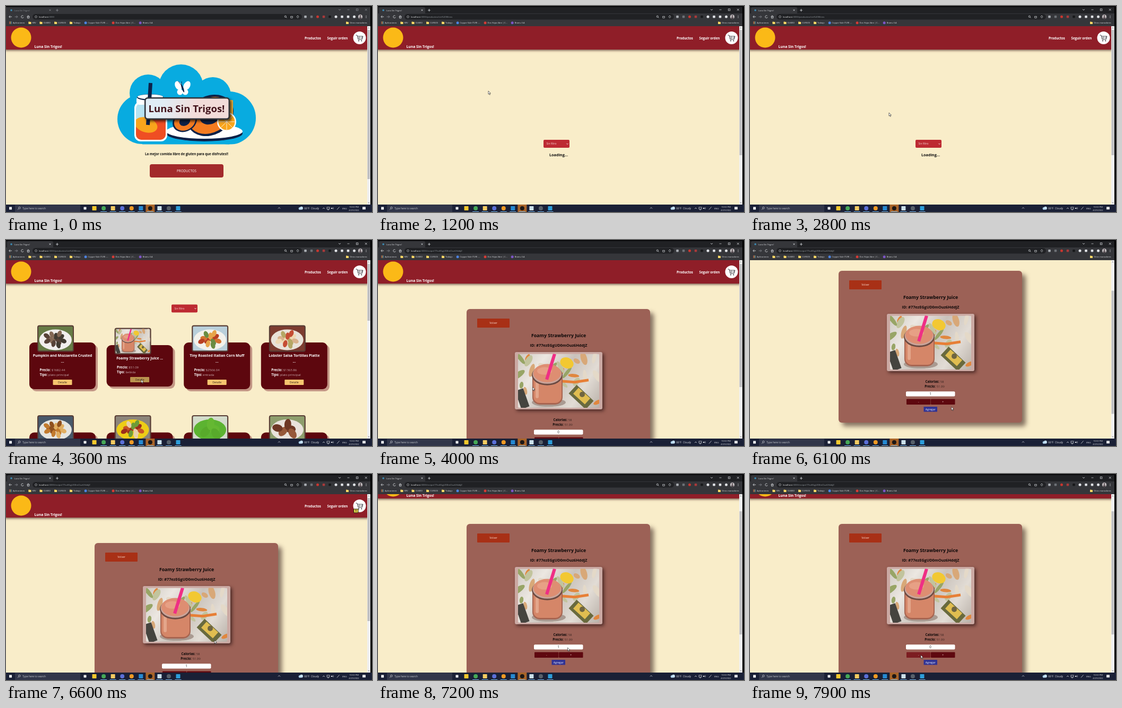
Recreate the animation shown at these times as an HTML page with a canvas. Size 690x388 px, loop 8 s.

```html
<!DOCTYPE html>
<html lang="es">
<head>
<meta charset="utf-8">
<title>Luna Sin Trigos!</title>
<style>
html, body { margin: 0; width: 100%; height: 100%; overflow: hidden; background: #000; }
canvas { display: block; width: 690px; height: 388px; }
</style>
</head>
<body>
<canvas id="stage"></canvas>
<script>
const LOOP = 8000, STEP = 100, TAU = Math.PI * 2;
const BRAND = 'Luna Sin Trigos!', DRINK = 'Foamy Strawberry Juice';
const cv = document.getElementById('stage');
const dpr = window.devicePixelRatio || 1;
cv.width = 690 * dpr;
cv.height = 388 * dpr;
const c = cv.getContext('2d');
let mouse = null;

// ---------- helpers ----------
function box(x, y, w, h, fill, r = 0) {
  c.fillStyle = fill;
  c.beginPath();
  c.roundRect(x, y, w, h, r);
  c.fill();
}
function oval(x, y, rx, ry, fill, rot = 0) {
  c.fillStyle = fill;
  c.beginPath();
  c.ellipse(x, y, rx, ry, rot, 0, TAU);
  c.fill();
}
const dot = (x, y, r, fill) => oval(x, y, r, r, fill);
function arc(x, y, r, color, w, from = 0, to = TAU) {
  c.strokeStyle = color;
  c.lineWidth = w;
  c.beginPath();
  c.arc(x, y, r, from, to);
  c.stroke();
}
function line(color, w, ...p) {
  c.strokeStyle = color;
  c.lineWidth = w;
  c.beginPath();
  for (let i = 0; i < p.length; i += 2) c.lineTo(p[i], p[i + 1]);
  c.stroke();
}
function cross(x, y, r, color, turn = 0) {
  for (let i = 0; i < 2; i++) {
    const a = turn + i * Math.PI / 2, dx = r * Math.cos(a), dy = r * Math.sin(a);
    line(color, 0.8, x - dx, y - dy, x + dx, y + dy);
  }
}
// Chevron opening away from the direction (dx, dy)
function chevron(x, y, dx, dy, r, color) {
  line(color, 0.8, x - r * (dx + dy), y - r * (dy + dx), x, y, x - r * (dx - dy), y - r * (dy - dx));
}
function clipped(x, y, w, h, r, paint) {
  c.save();
  c.beginPath();
  c.roundRect(x, y, w, h, r);
  c.clip();
  paint();
  c.restore();
}
function shadow(d, blur, color, paint) {
  c.save();
  c.shadowColor = color;
  c.shadowBlur = blur * dpr;
  c.shadowOffsetX = c.shadowOffsetY = d * dpr;
  paint();
  c.restore();
}
function font(size, weight) {
  c.font = `${weight} ${size}px "Open Sans", "Noto Sans", sans-serif`;
}
function text(s, x, y, size, color, weight = 400, align = 'left') {
  font(size, weight);
  c.textAlign = align;
  c.fillStyle = color;
  c.fillText(s, x, y);
  return c.measureText(s).width;
}
const bold = (s, x, y, size, color, align) => text(s, x, y, size, color, 700, align);
function field(label, value, x, y, color, centered) {
  const size = 6.1;
  font(size, 700);
  const w = c.measureText(label + ' ').width;
  font(size, 300);
  if (centered) x -= (w + c.measureText(value).width) / 2;
  bold(label, x, y, size, color);
  text(value, x + w, y, size, color, 300);
}
function button(label, x, y, w, h, fill, hover, ink, size, r = 1) {
  const over = mouse && mouse[0] >= x && mouse[0] <= x + w && mouse[1] >= y && mouse[1] <= y + h;
  box(x, y, w, h, over ? hover : fill, r);
  text(label, x + w / 2, y + h / 2 + size * 0.36, size, ink, 400, 'center');
}
function seeded(seed) {
  return () => (seed = seed * 16807 % 2147483647) / 2147483647;
}
// Eased moves: each is [from, to, ...values], starting at `value`
function follow(value, moves, t) {
  for (const [from, to, ...goal] of moves) {
    const u = Math.min(1, Math.max(0, (t - from) / (to - from))), e = u * u * (3 - 2 * u);
    value = value.map((v, i) => v + (goal[i] - v) * e);
  }
  return value;
}

// ---------- browser and desktop ----------
const INK = '#dfe1e5', DIM = '#8b8f95';
function bookmark(label, x, color) {
  if (color) dot(x + 2.5, 31.7, 2.5, color);
  else {
    box(x, 29.4, 2.5, 2, '#f5c94c', 0.5);
    box(x, 30.1, 5, 3.9, '#fbd866', 0.5);
  }
  return x + 14 + text(label, x + 7, 33.2, 3.9, INK);
}
function browser(url, active) {
  const frame = active ? INK : DIM;
  box(0, 0, 687, 14, active ? '#202124' : '#35363a');
  box(0, 0, 690, 2, '#08080a');
  box(2, 2, 87, 14, '#35363a', 3);
  box(0, 14, 687, 24, '#35363a');
  dot(10, 8, 1.8, '#3d8fb8');
  text(BRAND, 15.5, 9.6, 4, frame);
  cross(83, 7.8, 2, frame, Math.PI / 4);
  cross(96.5, 8, 2.5, frame);
  chevron(629, 8, 0, 1, 2, frame);
  line(frame, 0.7, 643.5, 7, 647.5, 7);
  c.strokeRect(660.3, 5.3, 3.5, 3.5);
  cross(678.7, 7, 2.6, frame, Math.PI / 4);
  // navigation
  line(INK, 0.8, 5.8, 20.3, 11, 20.3);
  chevron(5.7, 20.3, -1, 0, 2.3, INK);
  line(DIM, 0.8, 16.5, 20.3, 21.7, 20.3);
  chevron(21.8, 20.3, 1, 0, 2.3, DIM);
  arc(31, 20.3, 2.3, INK, 0.8, 0.3, 5.4);
  chevron(42, 17.8, 0, -1, 2.6, INK);
  c.strokeRect(40.4, 19.8, 3.2, 3);
  box(50, 15, 508, 10.6, '#202124', 5.3);
  arc(56.5, 20.3, 1.9, INK, 0.6);
  const w = text('localhost', 62, 21.8, 4.3, '#f1f3f4');
  text(':3000' + url, 62 + w, 21.8, 4.3, '#9aa0a6');
  arc(526.8, 19.8, 1.6, INK, 0.7);
  line(INK, 0.7, 528, 21, 529.5, 22.5);
  c.strokeRect(536.8, 19.5, 3.4, 3);
  chevron(550, 18, 0, -1, 2, INK);
  chevron(550, 22.5, 0, 1, 2, INK);
  // extensions
  ['#a9adb2', '#6c7075', '#c9362f', '#a83a3a', '#17181a', INK, INK, INK, INK, '#c9c3c5'].forEach((col, i) => {
    const x = 564.5 + 11.5 * i;
    if (i % 3 === 2 || i === 9) dot(x, 20.3, i === 9 ? 4 : 2.5, col);
    else box(x - 2.3, 18, 4.6, 4.6, col, 1);
  });
  dot(668, 19, 1.4, '#4a4046');
  oval(668, 22.6, 2.5, 1.5, '#4a4046');
  for (let i = -1; i < 2; i++) dot(679, 20.3 + i * 1.8, 0.6, INK);
  // bookmarks
  for (let i = 0; i < 9; i++)
    box(6 + i % 3 * 1.7, 29.2 + Math.floor(i / 3) * 1.7, 1.2, 1.2, ['#df6a55', '#e2b94c', '#63a8d8'][i % 3]);
  let x = 20 + text('Aplicaciones', 13, 33.2, 3.9, INK);
  for (const s of ['KRV', 'OLMED', 'CURSOS', 'Trabajo']) x = bookmark(s, x);
  x = bookmark('Copper Vale (TUR) -...', x, '#4c83e0');
  x = bookmark('Dos Hojas libre | C...', x, '#d63b35');
  bookmark('Bramu S.A', x, '#7d55c7');
  bookmark('Otros marcadores', 641, '');
}
function taskbar() {
  box(0, 374, 690, 14, '#1a2036');
  box(6, 378.5, 5, 5, '#f0f3f5');
  box(17, 374.5, 123, 13.5, '#31364a');
  arc(25.3, 380.3, 1.8, INK, 0.7);
  line(INK, 0.7, 24, 381.7, 22, 383.7);
  text('Type here to search', 31, 382.8, 4.8, '#c4c8cc');
  ['#e6e8eb', '#f4c82d', '#45a857', '#f3cb61', '#5b6fd8', '#f09a24', '#2589d2', '#1c1715', '#cbe0ea', '#57606a', '#2c9dda']
    .forEach((col, i) => {
      const x = 149 + 17.55 * i, r = i ? 4 : 2.5;
      if (i === 7) box(x - 8.5, 374, 17, 14, '#a86429');
      if ([2, 4, 5, 7, 9].includes(i)) dot(x, 381, r, col);
      else box(x - r, 381 - r, r * 2, r * 2, col, 0.7);
      if (i > 1) box(x - 6, 387, 12, 1, '#76b9ed');
    });
  chevron(515, 379.5, 0, -1, 2, INK);
  dot(554, 381.5, 2.4, '#a9cfee');
  dot(557, 380.7, 2.9, '#c5e1f5');
  text('66°F  Cloudy', 562.3, 382.8, 4.8, INK);
  chevron(599, 380, 0, -1, 2, INK);
  line(INK, 0.7, 606, 384, 609, 384);
  c.strokeRect(605, 379, 5, 3.5);
  box(613, 380, 2.5, 2, INK);
  arc(615, 381, 2.4, INK, 0.7, -0.9, 0.9);
  line(INK, 0.8, 624, 383.5, 628.5, 378.5);
  text('ENG', 634, 382.6, 4.2, INK);
  text('10:53 PM', 656, 379.7, 4.1, INK, 400, 'center');
  text('4/25/2022', 656, 386.2, 4.1, INK, 400, 'center');
  box(672, 378.3, 6, 5, INK, 0.5);
}
function scrollbar(y, h) {
  box(681, 38, 6, 336, '#f1f1f1');
  chevron(684, 40.8, 0, -1, 1.3, '#606060');
  chevron(684, 371.2, 0, 1, 1.3, '#606060');
  box(681.5, y, 5, h, '#bfbfc1');
}

// ---------- site ----------
function header(badge) {
  shadow(2, 4, 'rgba(60,20,20,.65)', () => box(-4, 38, 685, 44, '#8f1e28'));
  dot(28.5, 59.5, 19, '#fbb917');
  bold(BRAND, 53.5, 79, 6.73, '#fff');
  bold('Productos', 563, 63, 6.15, '#fff');
  bold('Seguir orden', 605.5, 63, 6.15, '#fff');
  dot(666.5, 60, 12, '#fff');
  const k = '#34343c';
  line(k, 0.9, 659.5, 55, 662, 55, 664, 63, 671, 63, 673, 57, 662.5, 57);
  line(k, 0.6, 663, 60, 672, 60);
  for (const x of [665, 670.3]) {
    line(k, 0.6, x + 1, 57, x + 1, 63);
    dot(x, 65.5, 1.1, k);
  }
  if (badge) {
    box(655, 65.5, 9.5, 8, '#28230f', 1);
    box(656, 66.5, 7.5, 6, '#d9ca47');
    bold('1', 659.7, 71.4, 5, '#222', 'center');
  }
}
function select(y) {
  box(312, y, 49, 15, '#bd2a32', 2);
  text('Sin filtro', 317.5, y + 9.3, 4.9, '#f6dcd8');
  chevron(357, y + 8.5, 0, 1, 1.7, '#fff');
}
function hero() {
  const blue = '#08abe0', navy = '#0d2148', orange = '#f47b20', sun = '#f9a51c';
  clipped(200, 100, 280, 160.5, 0, () => {
    [[257, 213, 47], [268, 164, 35], [330, 152, 42], [390, 168, 34], [421, 211, 50]]
      .forEach(([x, y, r]) => dot(x, y, r, blue));
    box(257, 170, 164, 91, blue);
    // plate and fruit
    oval(374, 240, 72, 15, navy);
    oval(374, 236, 72, 14, '#fff');
    for (const [x, y, r] of [[385, 206, 46], [337, 217, 24]]) {
      oval(x, y, r, r * 0.8, navy, -0.5);
      oval(x, y, r - 3, r * 0.7, orange, -0.5);
      oval(x, y, r * 0.45, r * 0.35, navy, -0.5);
    }
    box(420, 177, 8, 30, '#f8b83d', 2);
    ['#fff', sun].forEach((col, i) => dot(416, 218, 18 - i * 2.5, col));
    for (let i = 0; i < 2; i++) cross(416, 218, 15, '#fff', i * Math.PI / 4);
    // jar
    box(242, 180, 62, 75, '#fff', 12);
    clipped(245, 183, 56, 69, 10, () => {
      box(245, 183, 56, 69, '#b7e3f1');
      box(245, 214, 56, 38, '#ef4e23');
      oval(264, 224, 22, 14, sun, 0.3);
    });
    box(246, 171, 53, 15, '#fff', 5);
    oval(272, 172, 25, 6, navy);
    oval(272, 171, 24, 4.5, '#fff');
    line(navy, 7, 272.5, 145, 267.5, 224);
    // butterfly
    for (const side of [-1, 1]) {
      oval(333 + side * 8, 150, 6, 9, '#fff', side * 0.5);
      dot(333 + side * 5, 162, 5.5, '#fff');
      line(navy, 0.9, 331, 150, 328 + side * 3, 142);
    }
    oval(333, 155, 1.6, 8, navy, -0.35);
  });
  shadow(3, 5, 'rgba(0,0,0,.7)', () => box(261, 172, 161, 42, '#30343b', 6));
  const glass = c.createLinearGradient(264, 175, 419, 211);
  glass.addColorStop(0.2, '#e0edf6');
  glass.addColorStop(0.6, '#f2dcd9');
  box(263.5, 174.5, 156, 37, glass, 4);
  bold(BRAND, 340.5, 199.5, 18.5, '#42141c', 'center');
}
function home() {
  header(false);
  hero();
  bold('La mejor comida libre de gluten para que disfrutes!!', 340.5, 281, 6.1, '#111', 'center');
  button('PRODUCTOS', 271, 298, 139, 25, '#a32a2b', '#a32a2b', '#fff', 6.2, 4);
  scrollbar(45, 281);
}
function loading() {
  header(false);
  select(252);
  bold('Loading...', 340.5, 283, 7.3, '#111', 'center');
  scrollbar(45, 236);
}

// Flat food pictures on a 153 x 101 field
function drinkPhoto() {
  const rnd = seeded(41), leaf = ['#98a566', '#e4d9c8', '#d8a878', '#c2c49d', '#e0873f'];
  const cloth = c.createLinearGradient(0, 0, 153, 101);
  ['#cfcac3', '#ece7e1', '#c9c2bb', '#e2dcd5', '#b9b1a9'].forEach((col, i) => cloth.addColorStop(i / 4, col));
  box(0, 0, 153, 101, cloth);
  for (let i = 0; i < 24; i++)
    oval(rnd() * 153, (i % 3 ? rnd() * 0.45 : rnd()) * 101, 6 + rnd() * 9, 3 + rnd() * 3, leaf[i % 5], rnd() * 3);
  oval(92, 17, 13, 10, '#f2c832', 0.4);
  line('#e77f36', 5, 80, 51, 107, 53, 133, 49);
  line('#45443f', 16, 2, 67, 14, 101);
  line('#696a3e', 22, 103, 66, 135, 96);
  line('#e0bd50', 15, 109, 69, 131, 89);
  dot(121, 76, 5, '#6f6541');
  // jar
  oval(58, 91, 32, 8, '#a99a91');
  box(27, 33, 57, 62, '#a76551', 14);
  box(29, 36, 53, 56, '#d58668', 12);
  box(33, 50, 6, 33, '#e3a68b', 3);
  ['#6b4a42', '#c9a49a', '#de8e72'].forEach((col, i) => oval(55, 40 - i * 2, 29 - i * 1.5, 19 - i, col));
  oval(50, 32, 14, 7, '#e7a085');
  line('#ef2f85', 6, 54, 48, 69, 0);
}
// A dish with n morsels in a sunflower layout
function plate(bg, dish, colors, n) {
  const size = 52 / Math.sqrt(n);
  box(0, 0, 153, 101, bg);
  oval(76, 56, 72, 43, dish);
  for (let i = 0; i < n; i++) {
    const a = i * 2.4, r = Math.sqrt((i + 0.5) / n);
    oval(76 + 46 * r * Math.cos(a), 53 + 27 * r * Math.sin(a), size, size * 0.65, colors[i % colors.length], a);
  }
}
const food = [
  ['#667b46', '#f1eeed', ['#574238', '#846855', '#423b32'], 13],
  null,
  ['#b9cfda', '#f3f1eb', ['#d47432', '#b83f22', '#e7a449', '#6a8c43'], 12],
  ['#7d3c30', '#e9e2d8', ['#d9b18b', '#efd9b3', '#c54d34', '#b5a765'], 12],
  ['#48586a', '#e5e4e0', ['#c27a2e', '#8f501f', '#e0ad61'], 13],
  ['#8c857a', '#edcd17', ['#c95426', '#9b2e1c', '#6d9b38', '#e8cfab'], 12],
  ['#d3dccb', '#5cb331', ['#65b832', '#58aa2b'], 4],
  ['#8e9e6d', '#e9e2db', ['#6e3825', '#96583a'], 5]
];
function picture(i, x, y, w, h) {
  clipped(x, y, w, h, 2, () => {
    c.translate(x, y);
    c.scale(w / 153, h / 101);
    if (food[i]) plate(...food[i]);
    else drinkPhoto();
  });
}
function card(i, x, y, name, price, kind) {
  const short = name === DRINK, h = short ? 78 : 88, mid = x + 62.5;
  if (short) y += 5;
  const end = y + h;
  box(x + 4, y + 4, 125, h, '#c39685', 9);
  box(x, y, 125, h, '#5d070e', 9);
  box(x + 15, y - 32.5, 69, 50, '#583d35', 4);
  picture(i, x + 17, y - 30.5, 65, 46);
  bold(short ? name + ' ...' : name, mid, y + 27.3, 6.8, '#fff', 'center');
  if (!short) bold('...', mid, y + 38, 6.8, '#fff', 'center');
  field('Precio:', price, x + 19.5, end - 33.7, '#fff');
  field('Tipo:', kind, x + 19.5, end - 24.7, '#fff');
  button('Detalle', x + 44.5, end - 18, 36, 10, '#f6c56f', '#bb934f', '#342419', 5.2);
}
function products() {
  header(false);
  select(121.5);
  const list = [
    ['Pumpkin and Mozzarella Crusted', '$1682.44', 'plato principal'],
    [DRINK, '$51.09', 'bebida'],
    ['Tiny Roasted Italian Corn Muff', '$2566.04', 'entrada'],
    ['Lobster Salsa Tortillas Platte', '$1363.86', 'plato principal']
  ];
  food.forEach((_, i) => card(i, 44 + i % 4 * 145.6, i < 4 ? 193 : 362.5, ...(list[i] || ['', '', ''])));
  scrollbar(45, 107);
}
function detail(scroll, count, badge) {
  const ink = '#0c0808';
  c.save();
  c.translate(0, -scroll);
  if (mouse) mouse = [mouse[0], mouse[1] + scroll];
  header(badge);
  shadow(7, 9, 'rgba(60,35,30,.6)', () => box(167, 130, 346, 286, '#9c6156', 6));
  button('Volver', 187, 148, 61, 17, '#a83016', '#8c2510', '#f7dcd1', 5);
  bold(DRINK, 340.5, 183, 8.74, ink, 'center');
  bold('ID: #77ezEGgUD0mOuz6HddjZ', 340.5, 201.3, 7.3, ink, 'center');
  shadow(3, 6, 'rgba(30,10,10,.65)', () => box(258, 211, 165, 108, '#cba9a3', 3));
  picture(1, 264, 214.5, 153, 101.5);
  field('Calorias:', '58', 348, 340.8, ink, true);
  field('Precio:', '51.09', 348, 349.6, ink, true);
  box(294, 357.3, 92.5, 9.2, '#fff', 2);
  text(count, 340, 364.3, 6.2, '#222', 400, 'center');
  ['-', '+'].forEach((s, i) =>
    button(s, 295 + i * 46, 371.5, 45.5, 10.5, '#5e080f', '#7c1d21', '#e3c4c0', 6));
  button('Agregar', 327.5, 386, 25.5, 9.5, '#303394', '#272a80', '#f0f0fa', 5.2, 0.5);
  c.restore();
  scrollbar(45 + scroll * 0.7, 232);
}
function arrow([x, y]) {
  c.save();
  c.translate(x, y);
  c.fillStyle = '#fff';
  c.beginPath();
  [[0, 0], [0, 6.2], [1.4, 4.9], [2.5, 7.3], [3.5, 6.8], [2.4, 4.5], [4.4, 4.4]].forEach(p => c.lineTo(...p));
  c.closePath();
  c.fill();
  c.strokeStyle = '#111';
  c.lineWidth = 0.6;
  c.stroke();
  c.restore();
}

// ---------- timeline ----------
const moves = [
  [100, 400, 322, 314], [600, 1200, 208, 160], [1400, 1700, 222, 163], [1800, 2100, 257, 191],
  [2500, 2800, 262, 201], [3000, 3500, 255, 263], [3800, 4300, 359, 303], [5000, 5300, 342, 318],
  [5500, 6400, 393, 313], [6900, 7500, 322, 341]
];
const scrolls = [[4300, 4500, 72], [6400, 6600, 0], [6900, 7200, 36]];
function draw(time) {
  const t = Math.floor(time % LOOP / STEP) * STEP;
  const cursor = t < STEP ? null : follow([330, 365], moves, t);
  mouse = cursor;
  c.setTransform(dpr, 0, 0, dpr, 0, 0);
  box(0, 0, 690, 388, '#000');
  box(0, 38, 687, 336, '#f9edc9');
  clipped(0, 38, 687, 336, 0, () => {
    if (t < 500) home();
    else if (t < 3000) loading();
    else if (t < 3800) products();
    else detail(follow([0], scrolls, t)[0], t >= 4800 && t < 7700 ? 1 : 0, t >= 5300);
  });
  browser(t < 500 ? '' : t < 3800 ? '/productos/sin%20filtros' : '/recipe/77ezEGgUD0mOuz6HddjZ', t >= 400);
  taskbar();
  if (cursor) arrow(cursor);
}
const start = performance.now();
function tick() {
  draw(performance.now() - start);
  requestAnimationFrame(tick);
}
tick();
</script>
</body>
</html>
```
